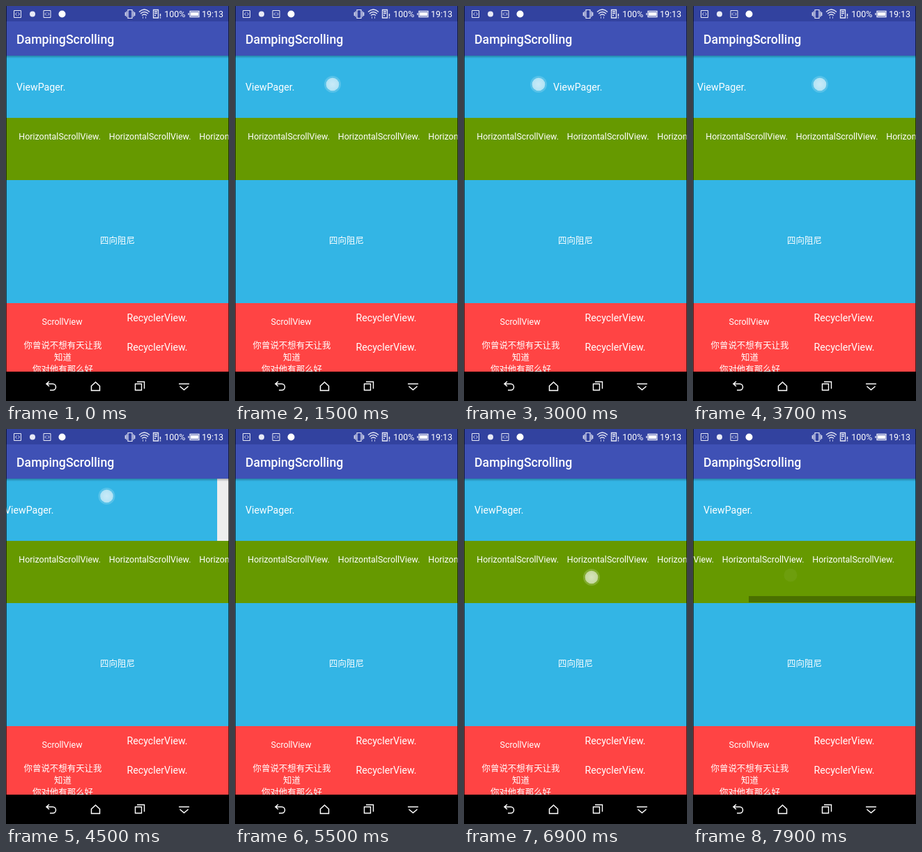
These frames come from a looping animation (320 by 565 pixels, 8000 ms). An HTML page with a canvas:

```html
<!DOCTYPE html>
<html>
<head>
<meta charset="utf-8">
<style>
  html, body { margin: 0; height: 100%; overflow: hidden; background: #000; }
  canvas { display: block; }
</style>
</head>
<body>
<canvas width="320" height="565"></canvas>
<script>
const LOOP = 8000, STEP = 100, WIDTH = 320, SWIPE = 90;
const BLUE = '#33b5e5', GREEN = '#669900', RED = '#ff4444', BACK = '#eeeeee';
const ctx = document.querySelector('canvas').getContext('2d');

const clamp = k => Math.min(Math.max(k, 0), 1);
const ease = k => Math.sin(k * Math.PI / 2) ** 1.3;

// A pull springs back; a slide starts with a small nudge and stays.
const pull = (start, span, peak, x, y) =>
  ({ start, span, x, y, dir: Math.sign(peak), move: k => peak * Math.sin(Math.PI * k) });
const slide = (start, span, distance, x, y) =>
  ({ start, span, x, y, dir: Math.sign(distance), move: k => distance * (.028 + .972 * ease(k)) });

const pagerMoves = [
  pull(1500, 600, 36, 140, 112),
  slide(2800, 400, -WIDTH, 182, 112),
  slide(3700, 400, -WIDTH, 182, 112),
  pull(4400, 400, -24, 182, 96),
  pull(5000, 500, -36, 182, 100)
];
const stripMoves = [
  pull(6200, 500, 36, 140, 211),
  pull(6900, 400, 30, 183, 212),
  slide(7600, 300, -106, 230, 209)
];

function shiftAt(moves, t) {
  return Math.round(moves
    .filter(m => t >= m.start)
    .reduce((sum, m) => sum + m.move(clamp((t - m.start) / m.span)), 0));
}

function rect(x, y, w, h, color) {
  ctx.fillStyle = color;
  ctx.fillRect(x, y, w, h);
}

function text(str, x, y, size = 12.44, align = 'left', weight = 400) {
  ctx.font = `${weight} ${size}px Roboto, "Noto Sans CJK SC", "Noto Sans CJK", sans-serif`;
  ctx.textAlign = align;
  ctx.fillStyle = '#fff';
  ctx.fillText(str, x, y);
}

function disc(x, y, r, color) {
  ctx.fillStyle = color;
  ctx.beginPath();
  ctx.arc(x, y, r, 0, 7);
  ctx.fill();
}

function stroke(path, width = 1, color = '#e8eaf6') {
  ctx.lineWidth = width;
  ctx.strokeStyle = color;
  ctx.stroke(new Path2D(path));
}

function clipped(y, h, color, draw) {
  ctx.save();
  ctx.beginPath();
  ctx.rect(0, y, WIDTH, h);
  ctx.clip();
  rect(0, y, WIDTH, h, color);
  draw();
  ctx.restore();
}

function statusBar() {
  rect(0, 0, WIDTH, 22, '#32429f');
  for (const x of [11.5, 54])
    stroke(`M${x} 6.500h10v10h-10zM${x + 4} 9.500l-2 2 2 2M${x + 6} 9.500l2 2-2 2`, 1);
  disc(38, 11.5, 4, '#e8eaf6');
  disc(80.5, 11.5, 5, '#fff');
  stroke('M175 5.500h6v12h-6zM173 7.500v8M183 7.500v8M171.300 9v5M184.700 9v5', 1.2);
  stroke('M191 8.500q7.500-7 15 0M193 11q5.500-5 11 0M195 13.500q3.500-3 7 0', 1.4);
  stroke('M196.500 15v3M200.500 15v3', 1, '#a8b0dc');
  stroke('M211.500 5.500h7v11.500h-7zM213 8h4M213 10.500h4M213 13.500h2', 1.3);
  stroke('M221.500 11v4M221.500 16v1.500', 1.4);
  text('100%', 227.3, 16);
  stroke('M264 7.500h13v8h-13zM262 10v3', 1.3);
  rect(265, 9, 11, 5, '#fff');
  text('19:13', 281, 16);
}

function toolbar() {
  rect(0, 22, WIDTH, 49, '#3f51b5');
  text('DampingScrolling', 15, 54, 17.7, 'left', 500);
  const shadow = ctx.createLinearGradient(0, 71, 0, 75);
  shadow.addColorStop(0, 'rgba(0,0,0,.28)');
  shadow.addColorStop(1, 'rgba(0,0,0,0)');
  rect(0, 71, WIDTH, 4, shadow);
}

function pager(shift) {
  clipped(71, 89, BACK, () => {
    for (let i = 0; i < 3; i++) {
      const x = shift + i * WIDTH;
      rect(x, 71, WIDTH, 89, BLUE);
      text('ViewPager.', x + 15, 121, 14.2);
    }
  });
}

function strip(shift) {
  clipped(160, 89, BACK, () => {
    rect(Math.max(shift, 0), 160, WIDTH, 89, GREEN);
    for (let i = 0; i < 3; i++)
      text('HorizontalScrollView.', 18.3 + shift + i * 129.5, 191);
    if (shift < 0) rect(-shift * .755, 239, 240, 9, '#4a7000');
  });
}

function lists() {
  clipped(425, 98, RED, () => {
    text('ScrollView', 80.5, 456, 12.44, 'center');
    ['你曾说不想有天让我', '知道', '你对他有那么好'].forEach((line, i) =>
      text(line, 81.5, 490 + i * 17, 12.44, 'center'));
    for (const y of [451, 493]) text('RecyclerView.', 173.5, y, 14.2);
  });
}

function navBar() {
  rect(0, 523, WIDTH, 42, '#000');
  stroke('M62 537l-4 3.500 4 3.500M58.500 540.500h8.500a4.500 4.500 0 0 1 0 9h-4', 1.5, '#fff');
  stroke('M122.500 543.500l6-5.500 6 5.500v6.500h-12z', 1.5, '#fff');
  stroke('M185.500 540.500h9v9h-9zM188 537.500h10.500v10', 1.4, '#fff');
  stroke('M248 540.500h15M249.500 544l6 5 6-5', 1.5, '#fff');
}

function touch(move, t) {
  const age = t - move.start, held = move.span * .6;
  if (age < 0 || age > held + 1.5 * STEP) return;
  const x = move.x + move.dir * SWIPE * clamp(age / held);
  if (age > held) return disc(x, move.y, 9.5, 'rgba(255,255,255,.05)');
  disc(x, move.y, 12, 'rgba(255,255,255,.18)');
  for (let r = 9.3; r > 0; r -= 2.4)
    disc(x, move.y, r, r > 9 ? 'rgba(255,255,255,.56)' : 'rgba(255,255,255,.1)');
}

function draw(now) {
  const t = Math.floor(now % LOOP / STEP) * STEP;
  pager(shiftAt(pagerMoves, t));
  strip(shiftAt(stripMoves, t));
  rect(0, 249, WIDTH, 176, BLUE);
  text('四向阻尼', 160, 340, 12.44, 'center');
  lists();
  statusBar();
  toolbar();
  for (const move of [...pagerMoves, ...stripMoves]) touch(move, t);
  for (const x of [0, WIDTH - 1]) rect(x, 0, 1, 565, 'rgba(0,0,0,.65)');
  navBar();
}

const began = performance.now();
function tick() {
  draw(performance.now() - began);
  requestAnimationFrame(tick);
}
tick();
</script>
</body>
</html>
```
